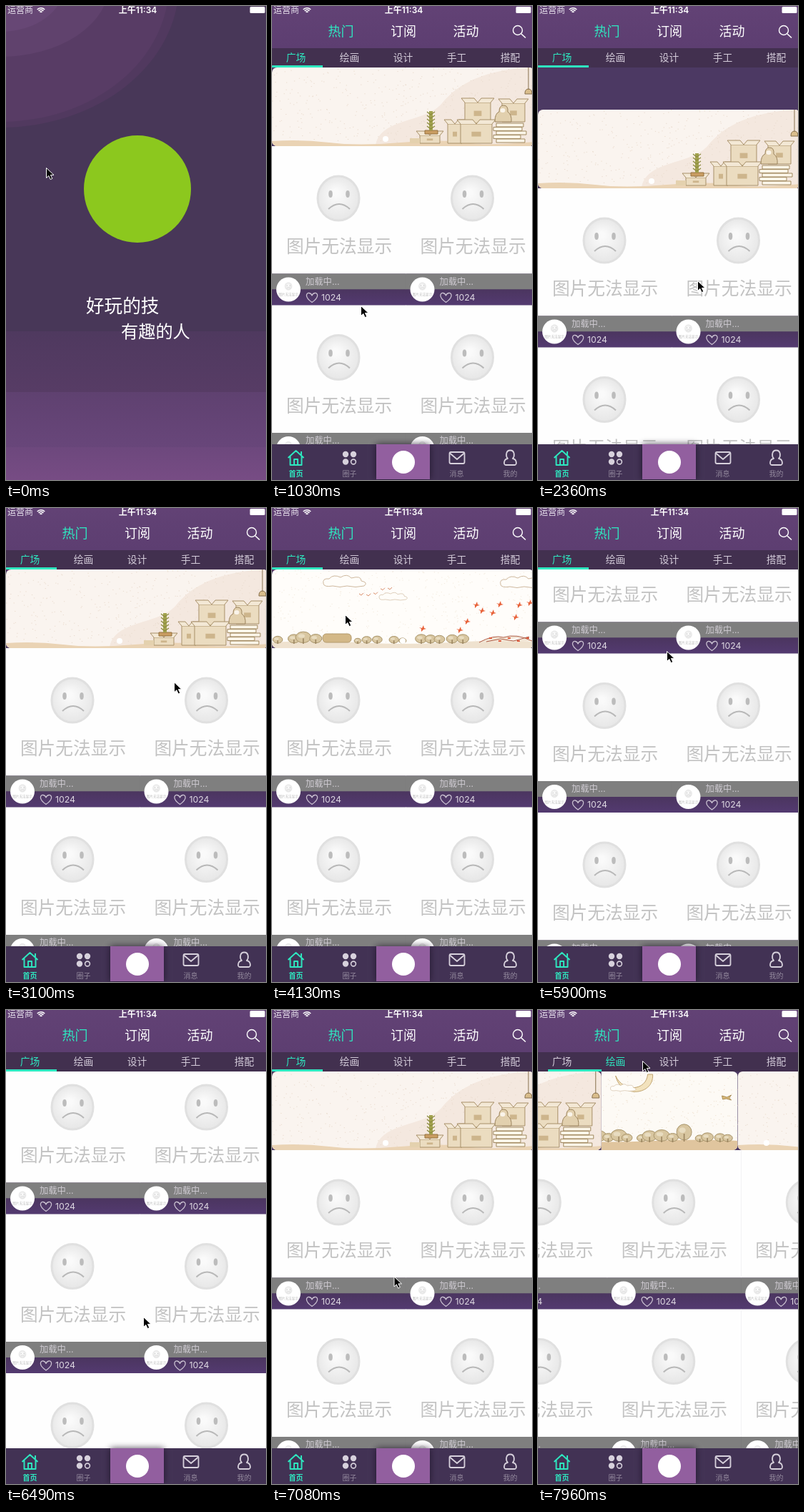
An HTML page with a canvas for the animation above (8 s loop, 364 by 663 pixels).

```html
<!DOCTYPE html>
<html lang="zh-CN">
<head>
<meta charset="utf-8">
<style>
html, body { margin: 0; width: 100%; height: 100%; overflow: hidden; background: #4c3963; }
canvas { display: block; width: 364px; height: 663px; }
</style>
</head>
<body>
<canvas id="stage"></canvas>
<script>
const W = 364, H = 663, LOOP = 8000, STEP = 147.5;
const PAGE = 375, PIC_W = 367, PIC_H = 110, ROW = 222.5;
const TEAL = '#2ee8c0';
const FONT = 'Inter, "Noto Sans CJK SC", "Noto Sans CJK", sans-serif';
const canvas = document.getElementById('stage');
const dpr = window.devicePixelRatio || 1;
canvas.width = W * dpr;
canvas.height = H * dpr;
const c = canvas.getContext('2d');

// Keyframes: [step, value...], joined by straight lines
const fade = [[0, 1], [1, .75], [2, .4], [3, .12], [4, 0]];
const scroll = [[14, 0], [15, 20], [16, 59], [17, 76], [18, 42], [19, 8], [20, 0],
  [33, 0], [34, -8], [35, -33], [36, -58], [37, -98], [38, -140], [39, -180], [41, -250],
  [42, -250], [43, -200], [44, -133], [45, -70], [46, -28], [48, 0]];
const slide = [[22, 0], [23, .15], [24, .7], [25, .95], [26, 1], [29, 1], [30, 1.35],
  [31, 1.85], [32, 2], [38, 2], [40, 3], [43, 3], [44, 4]];
const turn = [[52, 0], [53, .28], [54, .742]];
const line = [[52, 0], [53, .07], [54, .24]];
const mouse = [[0, 56, 226], [1, 58, 230], [5, 108, 330], [6, 108, 330], [7, 124, 419],
  [9, 148, 578], [10, 150, 580], [14, 213, 206], [15, 214, 264], [16, 223, 384],
  [17, 225, 430], [19, 225, 430], [22, 240, 150], [23, 210, 149], [24, 110, 149],
  [26, 140, 152], [28, 102, 149], [29, 210, 150], [31, 100, 150], [33, 156, 248],
  [35, 157, 215], [36, 157, 190], [38, 158, 108], [40, 180, 200], [42, 190, 312],
  [43, 191, 362], [44, 192, 429], [45, 193, 492], [47, 190, 470], [51, 112, 80],
  [52, 108, 72], [53, 118, 72], [54, 146, 71]];

function at(keys, n) {
  let i = keys.findIndex(k => k[0] > n);
  if (i === 0) return keys[0].slice(1);
  if (i < 0) return keys[keys.length - 1].slice(1);
  const a = keys[i - 1], b = keys[i], u = (n - a[0]) / (b[0] - a[0]);
  return a.slice(1).map((v, j) => v + (b[j + 1] - v) * u);
}

function rect(x, y, w, h, fill) {
  c.fillStyle = fill;
  c.fillRect(x, y, w, h);
}
function shape(fill, stroke, width = 1) {
  if (fill) { c.fillStyle = fill; c.fill(); }
  if (stroke) { c.strokeStyle = stroke; c.lineWidth = width; c.stroke(); }
}
function oval(x, y, rx, ry, fill, stroke, width) {
  c.beginPath();
  c.ellipse(x, y, rx, ry, 0, 0, 7);
  shape(fill, stroke, width);
}
function path(d, fill, stroke, width = 1) {
  const p = new Path2D(d);
  if (fill) { c.fillStyle = fill; c.fill(p); }
  if (stroke) { c.strokeStyle = stroke; c.lineWidth = width; c.stroke(p); }
}
function text(s, x, y, size, fill, align = 'center', weight = 400) {
  c.font = `${weight} ${size}px ${FONT}`;
  c.textAlign = align;
  c.textBaseline = 'middle';
  c.fillStyle = fill;
  c.fillText(s, x, y);
}
function moved(x, y, draw, scale = 1) {
  c.save();
  c.translate(x, y);
  c.scale(scale, scale);
  draw();
  c.restore();
}
function grad(y0, y1, ...stops) {
  const g = c.createLinearGradient(0, y0, 0, y1);
  stops.forEach((s, i) => g.addColorStop(i / (stops.length - 1), s));
  return g;
}
function rng(seed) {
  return () => (seed = (seed * 16807) % 2147483647) / 2147483647;
}

// Banner pictures, each PIC_W x PIC_H
function speckle(seed, color) {
  const r = rng(seed);
  c.fillStyle = color;
  for (let i = 0; i < 420; i++) c.fillRect(r() * PIC_W, r() * 104, 1.3, 1);
}
function crate(x, y, w, h) {
  c.beginPath();
  c.rect(x, y, w, h);
  shape('#ebdcc0', '#a78f68');
  path(`M${x} ${y}l-5 -6h${w * .5}l5 6M${x + w * .5} ${y}l5 -6h${w * .5}l-5 6`, '#f3e8d5', '#a78f68');
  rect(x + w * .35, y + h * .4, w * .3, h * .25, '#cdb58c');
}
function cloud(x, y, s) {
  moved(x, y, () => path('M-30 3q-2 -8 8 -7q6 -7 16 -2q9 -6 15 1q14 -4 14 4q10 2 4 7q-12 3 -24 0q-10 3 -20 0q-12 2 -13 -3z',
    '#fffdf9', '#cdb79d'), s);
}
function bird(x, y) {
  path(`M${x - 4} ${y - 1}l4 1l2 -4l1 4l3 1l-4 1l-3 3l0 -4z`, '#e8643c');
}
function bush(x, y, w, h) {
  oval(x, y - h * .6, w / 2, h / 2, '#d8c6a0', '#a8946a');
  oval(x - w * .12, y - h * .72, w * .22, h * .18, '#e8dcc0');
  rect(x - .8, y - h * .5, 1.6, h * .5, '#9b8560');
}
function bushes(seed, from, to, y, size, gap) {
  const r = rng(seed);
  for (let x = from; x < to; x += gap * (.6 + r() * .8)) {
    const w = size * (.75 + r() * .6);
    bush(x, y, w, w * .72);
  }
}

function boxes() {
  rect(0, 0, PIC_W, PIC_H, '#faf4ef');
  path('M145 110C150 70 215 78 238 50S300 2 367 0V110Z', '#f4e8df');
  speckle(11, '#eadccf');
  path('M0 103q40 -3 80 2t100 0t90 0t97 -1v6H0z', '#ead3b4');
  crate(207, 95, 28, 11);
  rect(193, 99, 14, 7, '#e4d1ae');
  crate(246, 79, 20, 27);
  crate(270, 49, 36, 29);
  crate(264, 79, 44, 27);
  crate(322, 50, 32, 26);
  c.beginPath();
  c.rect(214, 88, 18, 5);
  shape('#c99d62', '#94703f');
  rect(220, 61, 5, 27, '#a3a34f');
  for (let y = 64; y < 88; y += 5) path(`M217 ${y - 2}l5 4l6 -4`, null, '#8c8c42', 1.4);
  path('M312 76q0 -12 6 -14q0 -9 6 -9q7 0 6 9q6 4 5 14z', '#e2d0ae', '#9b835c');
  oval(323, 60, 3.5, 3, '#faf4ea');
  for (let i = 0; i < 5; i++) {
    c.beginPath();
    c.rect(314 - i % 2 * 4, 78 + i * 5.5, 38 + i % 3 * 2, 5);
    shape('#fbf5e8', '#a0885f');
  }
  path('M359 0V31M354 37q0 -7 5 -7q5 0 5 7z', '#d9bd8c', '#87714e');
}
function birds() {
  rect(0, 0, PIC_W, PIC_H, '#fffdfa');
  speckle(29, '#f3ebdf');
  cloud(102, 17, 1);
  cloud(170, 38, .66);
  cloud(350, 18, 1);
  const r = rng(5);
  for (let i = 0; i < 5; i++) path(`M${122 + i * 10} ${34 - i * 3 + r() * 6}l3 2l3 -3`, null, '#d98c68');
  for (const [x, y] of [[210, 82], [285, 49], [293, 57], [308, 60], [318, 48], [345, 49],
    [360, 46], [272, 72], [262, 84], [340, 66]]) bird(x, y);
  path('M0 102q60 -4 120 0t130 0t117 -1v9H0z', '#efe2cf');
  bushes(7, 8, 70, 104, 18, 17);
  c.beginPath();
  c.roundRect(71, 90, 40, 12, 5);
  shape('#d3b887', '#b39a6d');
  bushes(31, 120, 272, 104, 13, 19);
  path('M290 102q20 -11 34 -7q18 -6 40 5M300 101l20 -4l18 3l22 -6', '#f2e6d6', '#ad5b44');
  for (let i = 0; i < 5; i++) rect(304 + i * 13, 95 + i % 2 * 4, 4, 2, '#dd5b3f');
}
function grove() {
  rect(0, 0, PIC_W, PIC_H, '#fffdf9');
  speckle(43, '#f0e4d4');
  cloud(190, 25, .9);
  bird(103, 63);
  bird(293, 69);
  bird(313, 68);
  bird(331, 56);
  path('M0 97q50 -9 110 -2t120 0t137 -3v18H0z', '#eee4d4');
  bushes(17, 4, 110, 97, 24, 17);
  bushes(61, 118, 270, 98, 19, 16);
  bush(285, 100, 31, 34);
  bushes(83, 312, 367, 98, 25, 20);
}
function moon() {
  rect(0, 0, PIC_W, PIC_H, '#fdfaf5');
  speckle(71, '#efe3d2');
  path('M248 4C250 34 203 38 196 6C207 30 239 27 241 4Z', '#f2e2bd', '#c1a572');
  cloud(207, 23, .6);
  path('M345 34l7 2l6 -3l-3 4l3 3l-7 -2l-5 1z', '#d8b978', '#a98d58');
  path('M0 97q60 -3 120 0t130 0t117 0v13H0z', '#e0c59e');
  bushes(19, 20, 280, 99, 17, 18);
  bush(292, 98, 21, 22);
  bushes(23, 314, 362, 99, 17, 17);
}
const pics = [boxes, birds, grove, moon];

function banner(x, y, pos) {
  c.save();
  c.beginPath();
  c.rect(x, y, PIC_W, PIC_H);
  c.clip();
  const first = Math.floor(pos);
  for (let i = first; i < first + 2; i++) {
    const left = x + (i - pos) * PIC_W;
    if (left >= x + PIC_W || left > W) continue;
    moved(left, y, () => {
      c.beginPath();
      c.roundRect(0, 0, PIC_W, PIC_H, 7);
      c.clip();
      pics[i % 4]();
    });
  }
  c.restore();
  oval(x + 159 + Math.round(pos) % 4 * 24, y + 100, 4, 4, '#fff');
}

function face() {
  const g = c.createRadialGradient(-4, -8, 4, 0, 0, 32);
  g.addColorStop(0, '#fafafa');
  g.addColorStop(1, '#e6e6e6');
  oval(0, 0, 29, 31, g, '#e0e0e0', 3);
  oval(-11, -6, 2.8, 5, '#bcbcbc');
  oval(13, -6, 2.8, 5, '#bcbcbc');
  path('M-14 15Q1 1 16 15', null, '#b8b8b8', 2);
}
function cell(x, y) {
  rect(x, y, 188, 178.5, '#fefefe');
  moved(x + 93, y + 73, face);
  text('图片无法显示', x + 94, y + 142, 24.7, '#c2c2c2', 'center', 500);
  rect(x, y + 178.5, 188, 22, '#7f7f7f');
  rect(x, y + 200.5, 188, 22, grad(y + 200, y + 222, '#4b355f', '#533a70'));
  oval(x + 23, y + 200.5, 17, 17, '#fff');
  moved(x + 23, y + 196, face, .17);
  text('图片无法显示', x + 23, y + 208, 4.6, '#bbb');
  text('加载中...', x + 47, y + 190, 12.3, '#cfcbd2', 'left');
  moved(x + 56, y + 212, () =>
    path('M0 6.5C-11 -1 -8 -7 -4 -6.5Q-1 -6 0 -3Q1 -6 4 -6.5C8 -7 11 -1 0 6.5Z', null, '#c9c0d0', 1.3));
  text('1024', x + 69, y + 212, 12.3, '#ded8e2', 'left');
}
function page(x, y, pos, shift) {
  for (let top = 196 + y; top < 613; top += ROW) {
    if (top + ROW < 86) continue;
    cell(x, top);
    cell(x + 187.5, top);
  }
  if (y > -PIC_H) banner(x + shift, 86 + y, pos);
}

function status() {
  text('运营商', 2, 6, 12, '#e9e3ee', 'left');
  c.lineCap = 'butt';
  for (const r of [2, 4.6, 7.2]) {
    c.beginPath();
    c.arc(49, 10, r, -Math.PI * .76, -Math.PI * .24);
    shape(null, '#fff', 1.6);
  }
  text('上午11:34', 184.5, 6, 12, '#fff', 'center', 600);
  c.beginPath();
  c.roundRect(341.5, 1, 21, 9, 1.5);
  shape('#fff');
}
function header(picked, shift) {
  rect(0, 0, W, 59, grad(0, 59, '#624275', '#5d3e71'));
  status();
  ['热门', '订阅', '活动'].forEach((s, i) => text(s, 96.5 + i * 87.5, 37, 18, i ? '#fff' : TEAL));
  oval(344, 34, 6.5, 6.5, null, '#fff', 1.4);
  path('M349 39l6 5.5', null, '#fff', 1.6);
  rect(0, 59, W, 27, '#42304f');
  ['广场', '绘画', '设计', '手工', '搭配'].forEach((s, i) =>
    text(s, 33.5 + i * 75, 72.5, 13.8, i === picked ? TEAL : '#d3cbd9'));
  rect(-4 + 75 * shift, 83, 75, 3, TEAL);
}
function footer() {
  rect(0, 613, W, 50, '#423254');
  c.save();
  c.shadowColor = 'rgba(20,10,30,.75)';
  c.shadowBlur = 9 * dpr;
  rect(146, 613, 75, 49, '#925f9f');
  c.restore();
  oval(184, 638, 16, 16, '#fff');
  ['首页', '圈子', '', '消息', '我的'].forEach((s, i) =>
    text(s, 33.5 + i * 75, 655, 10, i ? '#93899d' : TEAL, 'center', i ? 400 : 600));
  c.lineJoin = 'round';
  path('M22.5 632L33.5 622L44.5 632M25.5 630V642H41.5V630M31 642V634H36V642M41 628V623', null, TEAL, 1.9);
  for (let i = 0; i < 4; i++) {
    const last = i === 3;
    oval(103 + i % 2 * 11, 627 + (i >> 1) * 10.5, last ? 3.4 : 4.2, last ? 3.4 : 4.2,
      last ? null : '#d7d1dc', last ? '#d7d1dc' : null, 1.6);
  }
  c.beginPath();
  c.roundRect(248.5, 624, 21, 16, 2);
  shape(null, '#d7d1dc', 1.8);
  path('M249 625.5L259 634L269 625.5', null, '#d7d1dc', 1.8);
  path('M333.5 621.5C340 621.5 340 630 337 633C343 634 343 642 340 642H327C324 642 324 634 330 633C327 630 327 621.5 333.5 621.5Z',
    null, '#d7d1dc', 1.8);
}

function splash() {
  rect(0, 0, W, H, '#483758');
  c.save();
  c.beginPath();
  c.rect(0, 0, W, 455);
  c.clip();
  oval(-8, -30, 250, 200, '#51395f');
  oval(-8, -30, 236, 192, '#583c65');
  oval(-8, -30, 152, 101, '#60426d');
  oval(-8, -30, 90, 66, '#674775');
  c.restore();
  rect(0, 455, W, 85, grad(455, 540, '#4f395f', '#573c65'));
  rect(0, 540, W, 77, grad(540, 617, '#5f4170', '#68467a'));
  rect(0, 617, W, 46, grad(617, 663, '#6d487d', '#774c84'));
  oval(184, 256, 75, 75, '#8cc81e');
  text('好玩的技', 112, 421, 25.6, '#fff', 'left');
  text('有趣的人', 161, 457, 24.2, '#fff', 'left');
  status();
}
function cursor(x, y) {
  moved(x, y, () => {
    c.lineJoin = 'miter';
    path('M.5 .5V14.5L3.8 11.4L6.2 16.6L8.8 15.4L6.4 10.4H11Z', '#000', '#fff');
  });
}

function draw(n) {
  c.setTransform(dpr, 0, 0, dpr, 0, 0);
  const [alpha] = at(fade, n), [y] = at(scroll, n), [p] = at(turn, n);
  rect(0, 0, W, H, '#4c3963');
  const x = -PAGE * p;
  page(x, y, at(slide, n)[0], 0);
  if (p > 0) page(x + PAGE, y, 3.48, -8);
  header(p > 0 ? 1 : 0, at(line, n)[0]);
  footer();
  if (alpha > 0) {
    c.globalAlpha = alpha;
    splash();
    c.globalAlpha = 1;
  }
  cursor(...at(mouse, n));
}

let shown = -1;
const start = performance.now();
function tick() {
  const t = (performance.now() - start) % LOOP;
  const n = Math.min(54, Math.floor((t + 8) / STEP));
  if (n !== shown) draw(shown = n);
  requestAnimationFrame(tick);
}
tick();
</script>
</body>
</html>
```
